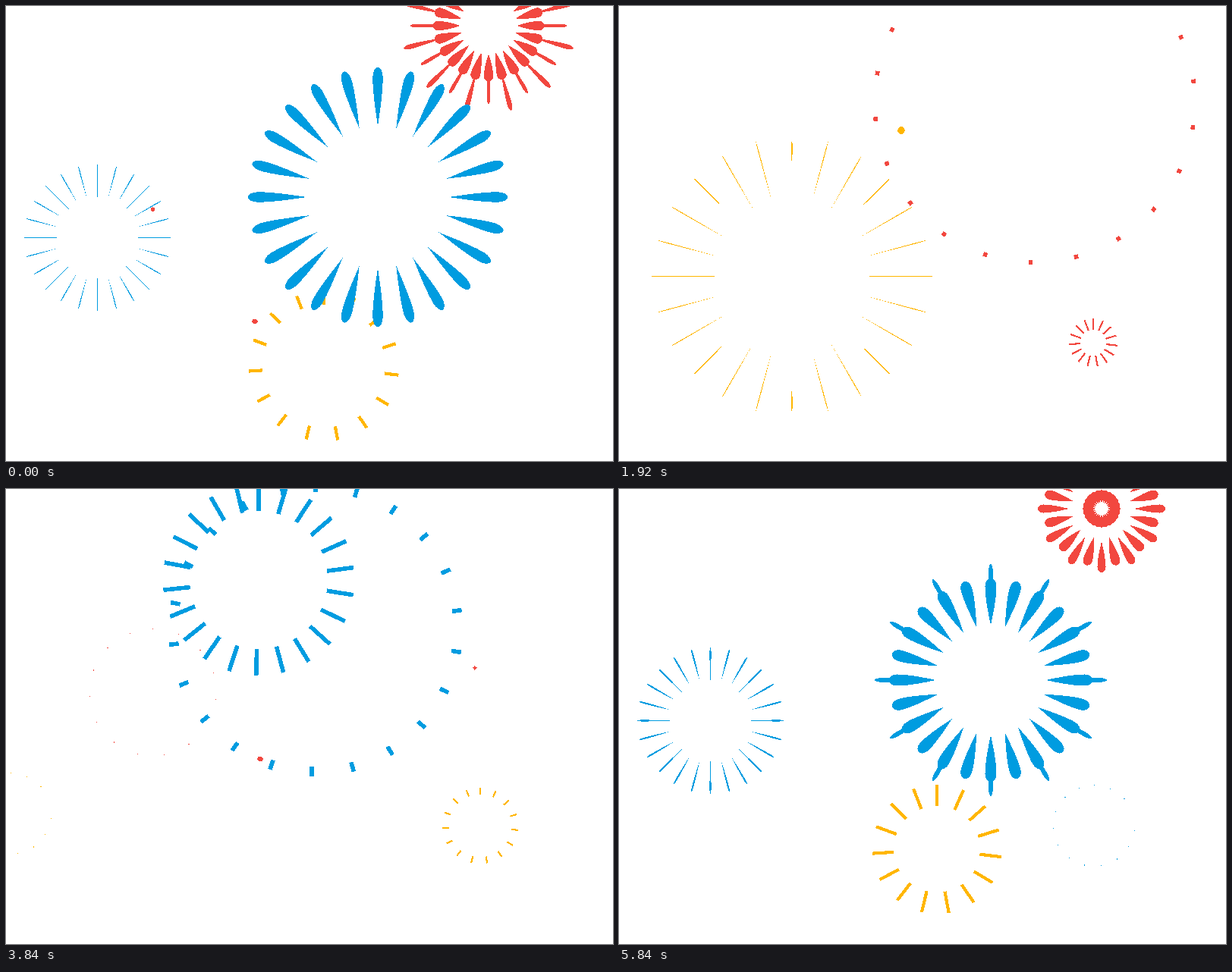
An HTML page for the animation above (5.92 s loop, 800 px wide and 600 px high).

```html
<!DOCTYPE html>
<html lang="en">
<head>
<meta charset="utf-8">
<title>Fireworks</title>
<style>
  html, body { margin: 0; width: 100%; height: 100%; overflow: hidden; background: #fff; }
  svg { display: block; width: 800px; height: 600px; }
</style>
</head>
<body>
<svg id="stage" viewBox="0 0 800 600" shape-rendering="crispEdges"></svg>
<script>
const stage = document.getElementById('stage');
const LOOP = 5920, STEP = 80, SPARK = .055;
const RED = '#f2473f', BLUE = '#009ce0', YELLOW = '#ffb600';

const sCurve = (t, middle, spread) => 1 / (1 + Math.exp((middle - t) / spread));

// A point given by its distance along a ray and its offset to the side of it.
function point(degrees, along, side = 0) {
  const a = degrees * Math.PI / 180, c = Math.cos(a), s = Math.sin(a);
  return (c * along - s * side).toFixed(2) + ' ' + (s * along + c * side).toFixed(2);
}

// Dashes whose inner ends follow the outer ones until only squares are left, which then shrink.
function ring({ count, turn, outerMid, outerSpread, innerMid, life, fade, thickness }) {
  return {
    life,
    stroked: true,
    draw(t, radius) {
      const width = Math.max(1, radius * thickness * Math.min(1, (life - t) / fade));
      const outer = radius * Math.max(sCurve(t, outerMid, outerSpread), Math.min(.045, t / 1800));
      const inner = Math.max(0, Math.min(radius * sCurve(t, innerMid, 80), outer - width));
      let d = '';
      for (let k = 0; k < count; k++) {
        const a = k * turn - 90;
        d += `M${point(a, inner)}L${point(a, outer)}`;
      }
      return { d, width };
    }
  };
}

function petal(angle, inner, outer, width) {
  const length = outer - inner;
  const half = Math.min(Math.max(width / 2, .55), length / 2);
  const cap = Math.min(Math.max(half, length * .18), length / 2);
  const belly = inner + length * .55, shoulder = outer - cap;
  return `M${point(angle, inner)}Q${point(angle, belly, -half)} ${point(angle, shoulder, -half)}` +
    `A${cap} ${half} ${angle} 0 1 ${point(angle, shoulder, half)}` +
    `Q${point(angle, belly, half)} ${point(angle, inner)}Z`;
}

const burst = t => Math.max(SPARK, sCurve(t, 458, 55));

// Waves of petals; "core" is the part of the radius left empty in the end.
const full = { offset: 0, count: 24, core: .55, from: 120, rise: 515, life: 1180, fade: 665, width: 15, outer: burst };
const thin = { offset: 0, count: 12, core: .55, from: 0, rise: 100, life: 610, fade: 60, width: 6, outer: t => t / (t + 110) };
const even = { offset: 0, count: 12, core: .55, from: 0, rise: 100, life: 500, fade: 170, width: 13, outer: t => t / 780 };
const odd = { offset: 15, count: 12, core: .55, from: 0, rise: 100, life: 520, fade: 200, width: 15, outer: t => (t / 550) ** 2 };
const lone = { offset: 15, count: 12, core: .34, from: 120, rise: 300, life: 900, fade: 300, width: 9, outer: burst };

function flower(...waves) {
  return {
    life: Math.max(...waves.map(wave => wave.life)),
    draw(t, radius) {
      let d = '';
      for (const { offset, count, core, from, rise, life, fade, width, outer } of waves) {
        if (t < from || t >= life) continue;
        const reach = outer(t), hollow = core * Math.max(0, reach - SPARK) / (1 - SPARK);
        const thick = radius / 185 * width * Math.min(1, t / rise, (life - t) / fade);
        for (let k = 0; k < count; k++) {
          d += petal(offset + k * 360 / count, hollow * radius, reach * radius, thick);
        }
      }
      return { d };
    }
  };
}

const dashes = ring({
  count: 15, turn: 24.2, outerMid: 425, outerSpread: 69, innerMid: 510,
  life: 1010, fade: 210, thickness: .039
});
const halo = ring({
  count: 22, turn: 16.5, outerMid: 450, outerSpread: 85, innerMid: 505,
  life: 1340, fade: 440, thickness: .026
});
const daisy = flower(thin, full);
const dahlia = flower(even, odd, full);
const star = flower(lone);

// kind, birth, x, y, colour, radius
const shows = [
  [dashes, 510, 406, 348, BLUE, 107],
  [dashes, 1470, 625, 444, RED, 54],
  [dashes, 2615, 419, 475, BLUE, 107],
  [dashes, 2835, 193.5, 268, RED, 84],
  [dashes, 2860, 6, 428, YELLOW, 54],
  [dashes, 3235, 625, 444, YELLOW, 54],
  [dashes, 4380, 419, 475, YELLOW, 107],
  [dashes, 4560, 477, 98, YELLOW, 54],
  [dashes, 4860, 626, 444, BLUE, 54],
  [dashes, 5320, 419, 475, YELLOW, 107],
  [dashes, 5870, 193.5, 268, RED, 84],
  [halo, 5900, 328, 416, RED, 215],
  [halo, 1030, 548, 127, RED, 215],
  [halo, 1885, 372, 164, YELLOW, 215],
  [halo, 3200, 408, 185, BLUE, 215],
  [halo, 3360, 333, 120, BLUE, 215],
  [halo, 3820, 335, 356, RED, 217],
  [daisy, 785, 228, 356.5, YELLOW, 185],
  [star, 2770, 737, 286, YELLOW, 185],
  [daisy, 3838, 618, 236, RED, 161],
  [dahlia, 4850, 120.5, 305.5, BLUE, 97],
  [dahlia, 5485, 636, 26, RED, 185],
  [daisy, 5330, 490, 252, BLUE, 187]
].map(([kind, birth, x, y, colour, radius]) => {
  const path = document.createElementNS(stage.namespaceURI, 'path');
  path.setAttribute('transform', `translate(${x} ${y})`);
  path.setAttribute('fill', kind.stroked ? 'none' : colour);
  path.setAttribute('stroke', kind.stroked ? colour : 'none');
  stage.append(path);
  return { kind, birth, radius, path };
});

function render(now) {
  const time = Math.floor(now % LOOP / STEP) * STEP;
  for (const { kind, birth, radius, path } of shows) {
    const age = (time - birth + LOOP) % LOOP;
    const { d, width = 0 } = age < kind.life ? kind.draw(age, radius) : { d: '' };
    path.setAttribute('d', d);
    path.setAttribute('stroke-width', width);
  }
}

const start = performance.now();
function frame() {
  render(performance.now() - start);
  requestAnimationFrame(frame);
}
frame();
</script>
</body>
</html>
```
